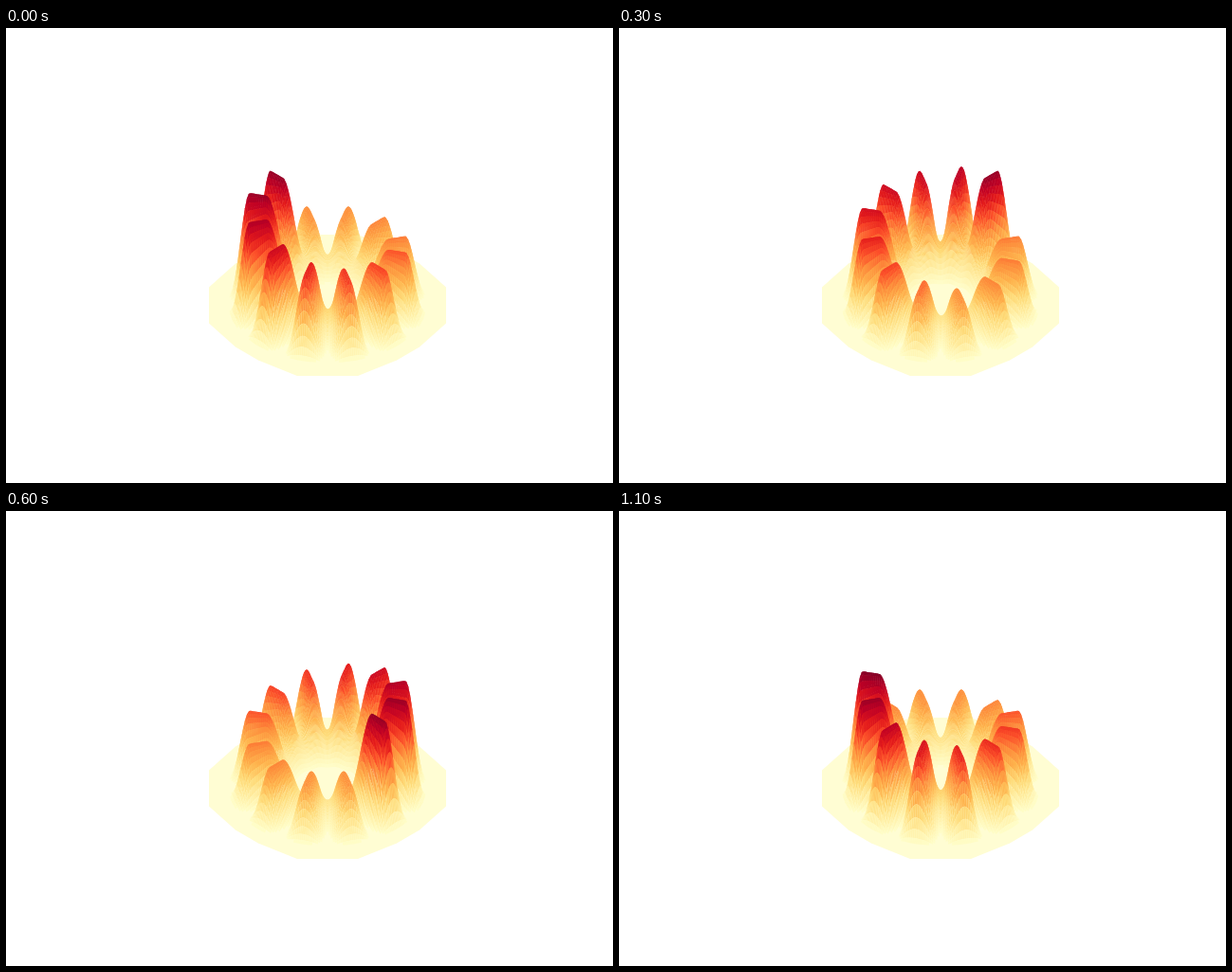
These frames come from a looping animation (640 by 480 pixels, 1.2 s). An HTML page with a canvas:

```html
<!DOCTYPE html>
<html>
<head>
<meta charset="utf-8">
<title>Spinner surface</title>
<style>
html, body { margin: 0; width: 100%; height: 100%; overflow: hidden; background: #fff; }
canvas { display: block; }
</style>
</head>
<body>
<canvas id="stage" width="640" height="480"></canvas>
<script>
const ctx = document.getElementById('stage').getContext('2d');
const LOBES = 12, STEP_MS = 100;
const CX = 339, CY = 292.5, TILT = 0.59;
const HEIGHTS = [111, 106, 101, 96, 90, 83, 76, 69, 60, 60, 60, 60]; // by age of the spoke
const PEAK = HEIGHTS[0];
const STOPS = ['ffffcc', 'ffeda0', 'fed976', 'feb24c', 'fd8d3c', 'fc4e2a', 'e31a1c', 'bd0026', '800026']
  .map(hex => [0, 2, 4].map(i => parseInt(hex.slice(i, i + 2), 16)));

// Polar mesh
const R0 = 30, DR = 2, RINGS = 40, SECTORS = 320;

const clamp = x => Math.min(Math.max(x, 0), 1);
const smoothstep = (from, to, x) => {
  const u = clamp((x - from) / (to - from));
  return u * u * (3 - 2 * u);
};
const spokeAngle = k => (135 - 30 * k) * Math.PI / 180;

function color(v) {
  const p = Math.min(clamp(v), 0.9999) * (STOPS.length - 1);
  const i = Math.floor(p);
  const mix = STOPS[i].map((c, n) => Math.round(c + (STOPS[i + 1][n] - c) * (p - i)));
  return `rgb(${mix})`;
}
const palette = Array.from({ length: 256 }, (_, i) => color(i / 255));

// Share of each spoke's height at a point: flat ridge along it, raised cosine across it.
// Spokes pointing to or away from the viewer stand a little lower.
function spokeWeights(r, angle) {
  return Array.from({ length: LOBES }, (_, k) => {
    const spoke = spokeAngle(k), d = angle - spoke;
    const along = r * Math.cos(d), across = clamp(Math.abs(r * Math.sin(d)) / 22);
    return smoothstep(33, 67, along) * smoothstep(105, 85, along)
      * Math.cos(across * Math.PI / 2) ** 2 * (1 - 0.08 * Math.sin(spoke) ** 2);
  });
}

const points = [];
for (let s = 0; s < SECTORS; s++) {
  for (let i = 0; i <= RINGS; i++) {
    const r = R0 + i * DR, angle = s / SECTORS * 2 * Math.PI;
    points.push({
      x: CX + r * Math.cos(angle),
      y: CY - TILT * r * Math.sin(angle),
      weights: spokeWeights(r, angle),
      z: 0
    });
  }
}

const quads = [];
for (let s = 0; s < SECTORS; s++) {
  for (let i = 0; i < RINGS; i++) {
    const a = s * (RINGS + 1) + i, b = (s + 1) % SECTORS * (RINGS + 1) + i;
    quads.push([a, a + 1, b + 1, b].map(n => points[n]));
  }
}
const depth = q => q.reduce((sum, p) => sum + p.y, 0);
quads.sort((a, b) => depth(a) - depth(b));

function fill(corners, style) {
  ctx.fillStyle = style;
  ctx.beginPath();
  for (const [x, y] of corners) ctx.lineTo(x, y);
  ctx.fill();
}

const quarter = [[125, 19], [97, 44], [73, 58], [32, 74.5]];
const mirror = (list, sx, sy) => list.map(([x, y]) => [x * sx, y * sy]);
const back = [...quarter].reverse();
const base = [
  ...quarter, ...mirror(back, -1, 1), ...mirror(quarter, -1, -1), ...mirror(back, 1, -1)
].map(([x, y]) => [CX + x, CY + y]);

function draw(head) {
  ctx.fillStyle = '#fff';
  ctx.fillRect(0, 0, 640, 480);
  fill(base, '#fffdd3');
  for (const p of points) {
    p.z = p.weights.reduce((sum, w, k) => sum + w * HEIGHTS[(head - k + LOBES) % LOBES], 0);
  }
  for (const q of quads) {
    const z = q.reduce((sum, p) => sum + p.z, 0) / 4;
    if (z < 1.5) continue;
    fill(q.map(p => [p.x, p.y - p.z]), palette[Math.min(255, Math.round(z / PEAK * 255))]);
  }
}

let shown = -1;
function tick() {
  const head = Math.floor(performance.now() / STEP_MS) % LOBES;
  if (head !== shown) draw(shown = head);
  requestAnimationFrame(tick);
}
tick();
</script>
</body>
</html>
```
